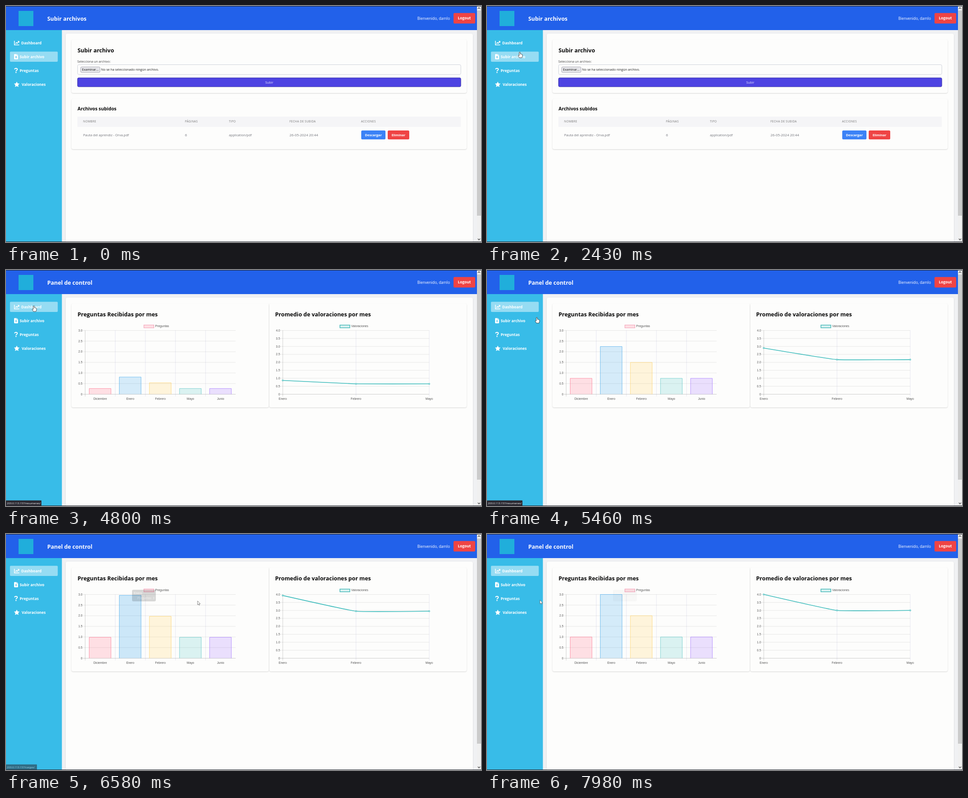
Write an HTML page that moves like this. It is 1059 by 529 pixels and loops after 8 s.

```html
<!DOCTYPE html>
<html lang="es">
<head>
<meta charset="utf-8">
<title>Panel</title>
<style>
  html, body { margin: 0; width: 100%; height: 100%; overflow: hidden; background: #f0f1f3; }
  svg { display: block; width: 100vw; height: 100vh; }
  text { font-family: "Open Sans", "Noto Sans", sans-serif; white-space: pre; }
  .bold { font-weight: 700; }
  .chart { font-family: "Liberation Sans", Arial, sans-serif; }
  .head { letter-spacing: .05em; }
  .card { fill: #fdfdfc; filter: drop-shadow(0 1px 1.2px rgba(0, 0, 0, .16)); }
</style>
</head>
<body>
<svg id="stage" viewBox="0 0 1059 529" preserveAspectRatio="none"></svg>
<script>
const LOOP = 8000, SWAP = 4450;
const HOST = '203.0.113.157';

const rect = (x, y, w, h, fill, r = 0, more = '') =>
  `<rect x="${x}" y="${y}" width="${w}" height="${h}" rx="${r}" fill="${fill}" ${more}/>`;
const text = (x, y, size, str, fill, cls = '', anchor = 'start') =>
  `<text x="${x}" y="${y}" font-size="${size}" fill="${fill}" class="${cls}" text-anchor="${anchor}">${str}</text>`;
const path = (d, more) => `<path d="${d}" ${more}/>`;
const card = (x, y, w, h) => rect(x, y, w, h, '#fdfdfc', 4, 'class="card"');
const button = (x, y, w, h, fill, label, size) =>
  rect(x, y, w, h, fill, 2.5) + text(x + w / 2, y + h / 2 + 2.8, size, label, '#fff', 'bold', 'middle');
const white = 'fill="#fff"';

// Page frame: header, sidebar, scrollbar
function frame() {
  return rect(0, 0, 1059, 529, '#f0f1f3')
    + rect(133, 62, 908, 480, '#fdfdfc', 4, 'class="card"')
    + rect(0, 54, 124.6, 475, '#38bce8')
    + rect(0, 0, 1050, 54, '#2261ea')
    + rect(28, 11, 33, 34, '#20aedb')
    + text(917, 31.3, 8.4, 'Bienvenido, damlo', '#fff')
    + button(997.7, 15.8, 48.3, 23.4, '#ef4444', 'Logout', 8.5)
    + rect(1050, 0, 9, 529, '#f0f0f0') + rect(1050, 10, 9, 460, '#cbcbcb')
    + path('M1052 6.5l2.5-3 2.5 3M1052 521.5l2.5 3 2.5-3', 'fill="none" stroke="#505050" stroke-width="1.2"')
    + rect(0, 0, 1059, 1, '#20242c') + rect(0, 528, 1059, 1, '#20242c');
}

function menu() {
  const icons =
    path('M18.7 78v9.2H29.5M21 84.5l2.4-2.6 1.8 1.7 3.4-3.9M26.2 79.3h2.7v2.6', 'fill="none" stroke="#fff" stroke-width="1.5"')
    + path('M18 109q0-1.3 1.3-1.3h4.2v3.4H27v7q0 1.3-1.3 1.3h-6.4q-1.3 0-1.3-1.3zM24.2 107.7l2.8 2.8h-2.8z', white)
    + path('M22.5 117.5v-4.3M20.5 115l2-2 2 2', 'fill="none" stroke="#5cc6e9" stroke-width="1.1"')
    + path('M19.2 142q.5-2.2 3-2.2 3 0 3 2.3 0 1.5-1.6 2.3-1.3.6-1.3 2.1', 'fill="none" stroke="#fff" stroke-width="1.9"')
    + `<circle cx="22.3" cy="149" r="1.3" ${white}/>`
    + path('M24 169.6l1.9 3.9 4.3.6-3.1 3 .7 4.3-3.8-2-3.8 2 .7-4.3-3.1-3 4.3-.6z', white);
  const labels = [[34, 'Dashboard'], [30.5, 'Subir archivo'], [30.5, 'Preguntas'], [35, 'Valoraciones']];
  return icons + labels.map(([x, s], i) => text(x, 86.2 + 31 * i, 8.4, s, '#fff', 'bold')).join('');
}

function uploadPage() {
  const heads = [[172, 'NOMBRE'], [399, 'PÁGINAS'], [497, 'TIPO'], [632, 'FECHA DE SUBIDA'], [791.5, 'ACCIONES']];
  const cells = [[172, 'Pauta del aprendiz - Orva.pdf', 7.5], [399, '6', 7.9],
    [497, 'application/pdf', 7.2], [632, '26-05-2024 20:44', 7.95]];
  return text(92, 32.6, 12.4, 'Subir archivos', '#fff', 'bold')
    + card(146, 75, 881, 120) + card(146, 208, 881, 113)
    + text(159.5, 103.5, 12.4, 'Subir archivo', '#080808', 'bold')
    + text(159, 126.7, 7.2, 'Selecciona un archivo:', '#444')
    + rect(159.5, 131.5, 854.5, 22, '#fdfdfc', 3, 'stroke="#cfd2da"')
    + rect(166.5, 136.5, 43, 12.5, '#e6e6ea', 2, 'stroke="#9a9aa6" stroke-width=".8"')
    + text(188, 145.4, 7.1, 'Examinar...', '#111', '', 'middle')
    + text(212, 145.4, 7.23, 'No se ha seleccionado ningún archivo.', '#222')
    + rect(159.5, 161, 854.5, 20, '#4d43e2', 2.5, 'stroke="#3730a8"')
    + text(587, 174, 7.3, 'Subir', '#e8e8ff', '', 'middle')
    + text(159.5, 233.7, 10.35, 'Archivos subidos', '#080808', 'bold')
    + rect(159, 248, 855, 23, '#f5f5f7')
    + heads.map(([x, s]) => text(x, 261.3, 6.4, s, '#777', 'head')).join('')
    + cells.map(([x, s, size]) => text(x, 292.2, size, s, '#707279')).join('')
    + button(792, 279, 54, 20, '#3b82f6', 'Descargar', 7.5)
    + button(851, 279, 48, 20, '#ef4444', 'Eliminar', 7.3);
}

const TOP = 135.5, BASE = 278.5, RISE = BASE - TOP;
const STEP = 67.1, LEFT = 176.5;
const COLORS = ['255,99,132', '54,162,235', '255,206,86', '75,192,192', '153,102,255'];
const COUNTS = [1, 3, 2, 1, 1];
const LINE_X = [617, 780.3, 943.5], RATINGS = [4, 3, 3];

function grid(x0, x1, columns, max) {
  let out = '';
  for (let v = 0; v <= max; v += .5) {
    const y = BASE - v / max * RISE;
    out += path(`M${x0 - 5} ${y}H${x1}`, `stroke="#000" stroke-opacity="${v ? .1 : .22}" stroke-width=".9"`)
      + text(x0 - 6, y + 2.3, 6.7, v ? v.toFixed(1) : '0', '#555', 'chart', 'end');
  }
  columns.forEach((x, i) => out += path(`M${x} ${TOP}V${BASE + 5}`,
    `stroke="${i ? '#30309a' : '#000'}" stroke-opacity="${i ? .12 : .2}" stroke-width=".9"`));
  return out;
}

function chartPage() {
  const tag = (x, s) => text(x, 290.6, 6.7, s, '#555', 'chart', 'middle');
  return text(92, 32.6, 12.4, 'Panel de control', '#fff', 'bold')
    + card(146, 75, 440, 233) + card(587, 75, 440, 233)
    + text(159.5, 103.5, 12.45, 'Preguntas Recibidas por mes', '#080808', 'bold')
    + text(600, 103.5, 12.45, 'Promedio de valoraciones por mes', '#080808', 'bold')
    + grid(LEFT, 512, COLORS.map((_, i) => LEFT + STEP * i), 3)
    + grid(LINE_X[0], 943.5, LINE_X, 4)
    + rect(307.3, 123.2, 22.5, 6.6, 'rgba(255,99,132,.2)', 0, 'stroke="#f08aa8" stroke-width=".8"')
    + text(332.5, 128.4, 6.8, 'Preguntas', '#555', 'chart')
    + rect(744.5, 123.5, 22, 6, 'rgba(75,192,192,.2)', 0, 'stroke="#45b9b9" stroke-width="1.5"')
    + text(769.5, 128.4, 6.7, 'Valoraciones', '#555', 'chart')
    + ['Diciembre', 'Enero', 'Febrero', 'Mayo', 'Junio'].map((s, i) => tag(210 + STEP * i, s)).join('')
    + ['Enero', 'Febrero', 'Mayo'].map((s, i) => tag(LINE_X[i], s)).join('')
    + '<g id="plot"></g>';
}

const ARROW = path('M0 0V9.6L2.2 7.6 3.7 10.8 5.2 10.1 3.8 7H6.7Z', 'transform="scale(.9)" fill="#fff" stroke="#444" stroke-width=".7"');
const HAND = path('M-1.2 .9Q0-.5 1.2 .9V4.6Q2.2 4 3 5 4 4.5 4.6 5.5 6 5.2 6 6.7V9.4L4.8 13H-.8L-3.7 8.4Q-3.5 6.6-1.2 8.2Z',
  'fill="#fff" stroke="#222" stroke-width=".8" stroke-linejoin="round"');

const stage = document.getElementById('stage');
stage.innerHTML = frame() + rect(8.8, 0, 106.6, 22.7, '#fff', 2, 'id="active" fill-opacity=".47"') + menu()
  + `<g id="upload">${uploadPage()}</g><g id="charts">${chartPage()}</g><g id="status"></g><g id="cursor"></g>`;
const [active, upload, charts, plot, status, cursor] =
  ['active', 'upload', 'charts', 'plot', 'status', 'cursor'].map(id => document.getElementById(id));

// Linear interpolation through rows of [time, ...values]
function track(rows, t) {
  if (t <= rows[0][0]) return rows[0].slice(1);
  for (let i = 1; i < rows.length; i++) {
    const a = rows[i - 1], b = rows[i];
    if (t <= b[0]) return a.slice(1).map((v, k) => v + (b[k + 1] - v) * (t - a[0]) / (b[0] - a[0]));
  }
  return rows[rows.length - 1].slice(1);
}

const MOVES = [[350, 560, 540], [900, 430, 395], [1650, 190, 225], [2100, 100, 130], [2430, 73, 103],
  [2950, 73, 103], [3350, 64, 80], [4180, 62, 79], [4800, 62, 80], [5100, 62, 80], [5460, 111, 106],
  [5950, 150, 125], [6300, 280, 142], [6580, 427, 150], [6900, 470, 172], [7250, 280, 160],
  [7600, 135, 150], [7980, 118, 148]];
const TIP = [[6250, 0], [6380, .45], [6720, 0], [7180, 0], [7330, .5], [8020, 0]];
const LINKS = [`${HOST}/cargas/`, `${HOST}/resumenes/`, `Transfiriendo datos desde ${HOST}...`];
const LINK_WIDTHS = [69, 79, 146];
// [start, end, link]
const NOTES = [[2620, 3350, 0], [3350, 3750, 1], [3750, SWAP, 2], [SWAP, 5680, 1], [5680, 6720, 0]];

// Quartic ease-out of the chart growth that begins at the given time
const growth = (t, begin) => 1 - (1 - Math.min(1, Math.max(0, (t - begin) / 3055))) ** 4;

function drawPlot(t) {
  const bars = growth(t, 4570), line = growth(t, 4620);
  const [tip] = track(TIP, t);
  let out = COUNTS.map((n, i) => {
    const x = 185.5 + STEP * i, y = BASE - n / 3 * RISE * bars;
    const alpha = i === 1 ? .2 + tip * .25 : .2;
    return path(`M${x} ${BASE}V${y}h48.5V${BASE}`,
      `fill="rgba(${COLORS[i]},${alpha})" stroke="rgb(${COLORS[i]})" stroke-width=".65"`);
  }).join('');

  const [a, m, b] = RATINGS.map((v, i) => [LINE_X[i], BASE - v / 4 * RISE * line]);
  const dx = .05 * (b[0] - a[0]), dy = .05 * (b[1] - a[1]);
  out += path(`M${a}C${a} ${m[0] - dx} ${m[1] - dy} ${m}C${m[0] + dx} ${m[1] + dy} ${b} ${b}`,
    'fill="none" stroke="#3dbcbc" stroke-width="1.6"');
  out += [a, m, b].map(([x, y]) =>
    `<circle cx="${x}" cy="${y}" r="1.6" fill="#a9dede" stroke="#3dbcbc" stroke-width=".8"/>`).join('');

  if (tip > 0) out += `<g opacity="${tip}">` + rect(281, 125, 53, 26, 'rgba(0,0,0,.8)', 3)
    + text(285, 135, 6.7, 'Enero', '#bbb', 'chart bold')
    + text(293, 145.5, 6.7, 'Preguntas: 3', '#bbb', 'chart') + '</g>';
  plot.innerHTML = out;
}

function drawStatus(t) {
  const note = NOTES.find(([from, to]) => t >= from && t < to);
  status.innerHTML = note
    ? rect(0, 516.5, LINK_WIDTHS[note[2]], 12.5, '#2b2a33', 1) + text(2, 525, 6.05, LINKS[note[2]], '#f4f4f4') : '';
  status.setAttribute('opacity', track([[6480, 1], [6700, 0]], t)[0]);
}

function drawCursor(t) {
  const [x, y] = track(MOVES, t);
  const loading = t > 3800 && t < SWAP;
  const onItem = x > 9 && x < 115 && y > 71 && (y - 71) % 31 < 23 && y < 187;
  cursor.innerHTML = onItem && !loading ? HAND : ARROW;
  cursor.setAttribute('transform', `translate(${x} ${y})`);
}

function draw(now) {
  const t = now % LOOP, swapped = t >= SWAP;
  upload.style.display = swapped ? 'none' : '';
  charts.style.display = swapped ? '' : 'none';
  active.setAttribute('y', swapped ? 71.2 : 102.2);
  if (swapped) drawPlot(t);
  drawStatus(t);
  drawCursor(t);
}

const start = performance.now();
(function tick() {
  draw(performance.now() - start);
  requestAnimationFrame(tick);
})();
</script>
</body>
</html>
```
